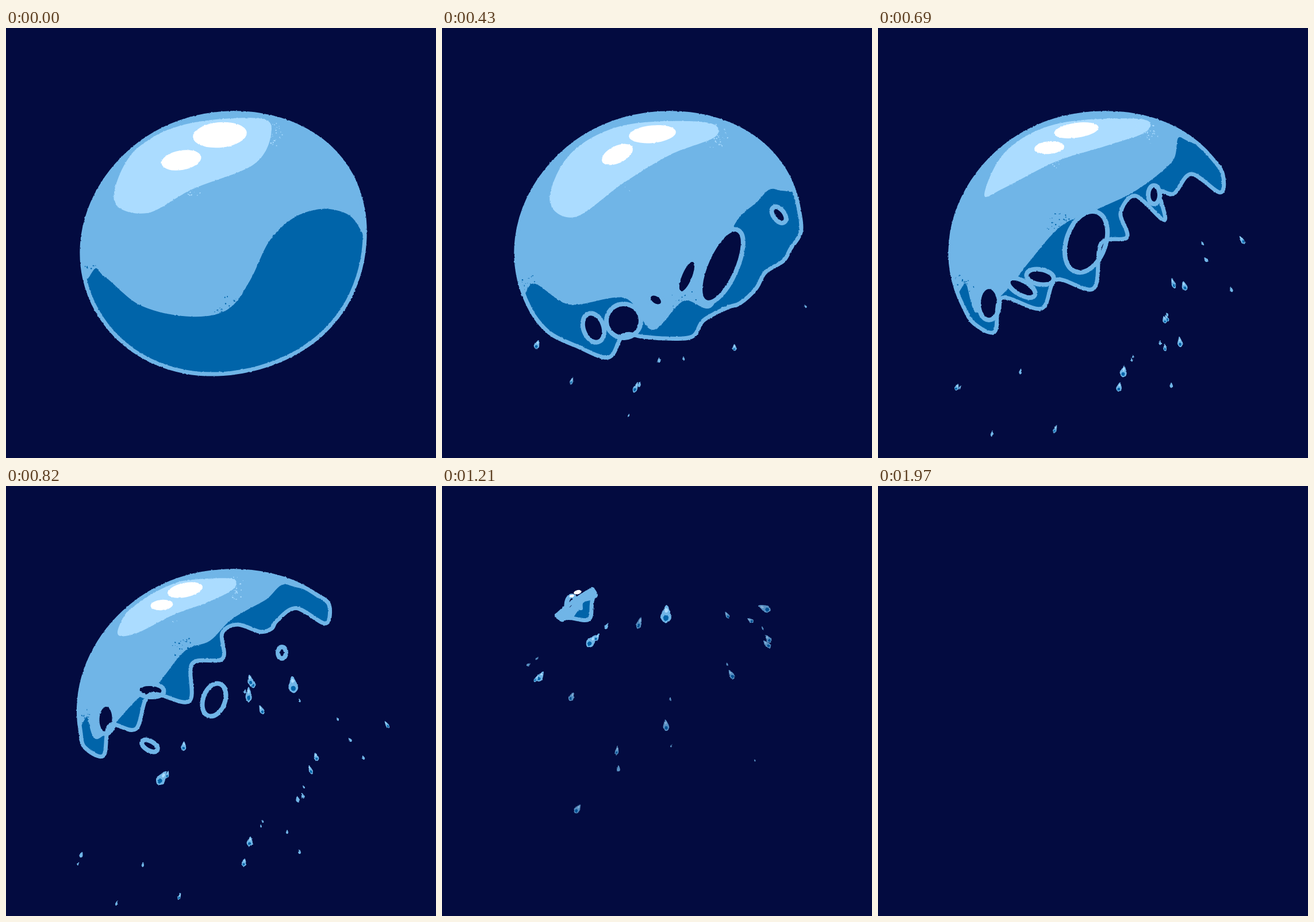
Animation, 748 px wide and 748 px high, one loop 2200 ms. Source, as an HTML page:

```html
<!DOCTYPE html>
<html lang="en">
<head>
<meta charset="utf-8">
<title>Bubble pop</title>
<style>
  html, body { margin: 0; width: 100%; height: 100%; overflow: hidden; background: #030b40; }
  svg { display: block; width: 100vw; height: 100vh; }
  #stage > g { display: none; }
  #stage > g.on { display: inline; }
</style>
</head>
<body>
<svg viewBox="0 0 748 748">
  <filter id="rough" x="0" y="0" width="748" height="748" filterUnits="userSpaceOnUse" color-interpolation-filters="sRGB">
    <feTurbulence type="fractalNoise" baseFrequency=".25" numOctaves="2" seed="4"/>
    <feDisplacementMap in="SourceGraphic" scale="2.5" xChannelSelector="R" yChannelSelector="G"/>
  </filter>
  <g id="stage" filter="url(#rough)"></g>
</svg>
<script>
const NIGHT = '#030b40', WATER = '#70b5e7', DEEP = '#0064a9', PALE = '#abdcff', WHITE = '#fff';
const LOOP = 2200, RIM = 7;
const { sin, cos, PI, hypot, atan2, max, min, round } = Math;

let seed = 11;
const random = (low = 0, high = 1) => {
  seed = seed * 16807 % 2147483647;
  return low + (high - low) * seed / 2147483647;
};
const mix = (a, b, t) => Array.isArray(a) ? a.map((v, i) => mix(v, b[i], t)) : a + (b - a) * t;
const list = text => text.split(' ').map(item => item.split(',').map(Number));
const range = (n, fn) => Array.from({ length: n }, (_, i) => fn(i));
const shrink = (shape, x, y) => shape.map(([px, py, ...size]) =>
  [x + (px - 265) * .3, y + (py - 195) * .3, ...size.map((v, i) => i < 2 ? v * .3 : v)]);

// Steps 0 to 12: start times of the pictures.
const startOf = step => step === 0 ? 0 : step < 10 ? 170 + 130 * step : [1540, 1740, 1970][step - 10];

// The ball is a slightly tilted ellipse; swell pushes its left side out.
function rim(angle, swell = 0, depth = 1) {
  const twice = sin(2 * angle);
  const r = depth * (1 - .036 * twice + .012 * twice ** 2 * (1 + cos(angle)) + swell * max(0, -cos(angle)));
  return [378 + 245.5 * r * cos(angle), 375 + 226.5 * r * sin(angle)];
}

// Key shapes by step; the steps between them are mixed.
const arc = { 1: [2.6, 6.4, 0], 3: [2.5, 5.99, .025], 4: [2.52, 5.75, .025], 6: [3.08, 5.25, .02], 8: [3.88, 4.21, .02] };
const edge = {
  1: list('600,434 588,450 570,498 542,532 508,526 492,564 418,537 378,566 350,592 300,566 260,571 238,572 210,552 178,517'),
  3: list('612,335 600,360 555,352 550,375 528,432 502,408 492,480 492,508 425,488 398,508 370,498 341,574 255,553 205,550'),
  4: list('595,286 545,254 515,288 490,286 498,334 448,292 422,322 433,364 388,375 375,453 310,438 284,488 215,470 203,528'),
  6: list('516,192 465,171 428,180 434,210 385,173 358,190 330,190 320,237 260,243 262,296 190,288 168,357 146,362 136,410'),
  8: range(14, i => rim(4.21 - .33 * i / 13, .02, .95 - .13 * sin(PI * i / 13) ** 2))
};
const shade = {
  0: list('148,428 172,433 235,483 320,502 385,490 424,440 460,368 510,325 570,316 616,350 650,480 380,680 100,560'),
  1: list('155,447 222,484 292,500 340,550 410,480 470,487 525,375 535,318 580,312 640,350 350,650 150,560'),
  3: list('152,447 222,478 345,440 392,500 430,470 475,476 484,328 560,288 583,250 640,330 350,650 150,560'),
  4: list('150,445 172,495 225,455 262,408 318,345 380,316 450,282 512,232 530,192 610,300 350,650 130,560'),
  6: list('128,360 148,385 230,288 262,286 303,230 330,222 335,182 390,165 455,153 520,190 350,400 130,430')
};
const shine = {
  0: list('440,157 310,168 222,215 188,300 245,322 325,280 430,238 461,185'),
  3: list('465,167 320,170 225,220 187,300 225,332 310,265 380,212 484,190'),
  4: list('455,158 310,167 222,215 185,290 220,278 310,232 400,204 467,180'),
  6: list('320,163 260,172 220,198 203,222 232,235 275,215 308,198 327,175')
};
// Ovals: x, y, radii, turn.
const glints = {
  0: list('372,186,47,22,-5 305,230,35,17,-10'),
  3: list('363,184,38,12,-6 305,215,26,14,-33'),
  4: list('345,178,39,13,-8 298,208,26,11,-5'),
  6: list('278,184,23,12,-15 244,206,13,7,-5')
};
const holes = {
  1: list('481,420,17,47,15 427,443,8,15,25 322,516,26,17,15 277,530,8,14,0'),
  3: list('492,408,28,82,33 425,422,9,40,20 310,503,26,34,-20 250,513,19,30,-40 372,473,20,12,35 586,325,11,24,-38'),
  4: list('282,433,20,9,10 193,479,14,25,0 362,372,30,51,20 480,290,6,12,0 250,452,22,8,30'),
  6: list('221,278,18,6,-3 154,332,8,18,5'),
  8: list('224,203,3,8,15')
};
shade[8] = shrink(shade[6], 225, 207);
shine[8] = shrink(shine[6], 232, 188);
glints[8] = shrink(glints[6], 232, 188);

function at(track, step) {
  const keys = Object.keys(track).map(Number);
  const from = keys.findLast(k => k <= step), to = keys.find(k => k >= step);
  if (from === to) return track[from];
  const a = track[from], b = track[to];
  // A part missing on one side grows from or shrinks to nothing.
  const fill = (own, other) => [...own, ...other.slice(own.length).map(([x, y, , , turn]) => [x, y, 0, 0, turn])];
  return a.length === b.length ? mix(a, b, (step - from) / (to - from))
    : mix(fill(a, b), fill(b, a), (step - from) / (to - from));
}

// Closed Catmull-Rom curve.
function curve(pts) {
  const point = i => pts[(i + pts.length) % pts.length];
  const handle = (p, a, b) => p.map((v, k) => (v + (b[k] - a[k]) / 6).toFixed(1));
  return pts.reduce((d, p, i) => {
    const q = point(i + 1);
    return d + `C${handle(p, point(i - 1), q)} ${handle(q, point(i + 2), p)} ${q}`;
  }, `M${pts[0]}`) + 'Z';
}
const blob = (fill, pts, more = '') => `<path fill="${fill}" d="${curve(pts)}" ${more}/>`;
const oval = (fill, [x, y, rx, ry, turn = 0], more = '') =>
  `<ellipse fill="${fill}" rx="${rx}" ry="${ry}" transform="translate(${x} ${y}) rotate(${turn})" ${more}/>`;
const outline = width => `stroke="${WATER}" stroke-width="${width}" stroke-linejoin="round"`;

const dust = (fill, [x, y], spread, count) => range(count, () => {
  const a = random(0, 2 * PI), r = spread * random() ** .7, size = random(.4, 1.3);
  return oval(fill, [x + r * cos(a), y + r * sin(a), size, size]);
}).join('');

function ball(step) {
  const [from, to, swell] = step ? at(arc, step) : [0, 2 * PI * 23 / 24, 0];
  const body = range(24, i => rim(mix(from, to, i / 23), swell));
  if (step) body.push(...at(edge, step));
  const dark = at(shade, step), light = at(shine, step);
  const spots = step < 7 ? dust(DEEP, dark[4], 24, 35) + dust(DEEP, dark[0], 18, 20)
    + dust(PALE, light[7], 22, 35) + dust(PALE, light[5], 18, 15) : '';
  return `<clipPath id="ball${step}"><path d="${curve(body)}"/></clipPath>`
    + blob(WATER, body)
    + `<g clip-path="url(#ball${step})">${blob(DEEP, dark)}${blob(PALE, light)}${spots}</g>`
    + (step ? at(holes, step).map(h => oval(NIGHT, h, outline(16) + ' paint-order="stroke"')).join('') : '')
    + blob('none', body, outline(RIM))
    + at(glints, step).map(g => oval(WHITE, g)).join('');
}

// Droplets tear off the previous edge, fly outward, slow down and shrink.
const drops = range(8, i => i + 1).flatMap(born => range(round(10 * sin(PI * born / 10)), () => {
  const torn = at(edge, max(1, born - 1));
  const [x, y] = torn[Math.floor(random(0, torn.length))];
  const away = atan2(y - 100, x - 400) + random(-.3, .3);
  const length = 3.5 + random(5, 11 + born) * random() ** 1.5;
  return { born, x, y, away, length, slim: random(.38, .6), reach: random(50, 200), life: random(1, 4) };
}));

function droplet({ born, x, y, away, length, slim, reach, life }, step) {
  const age = step - born;
  if (age < 0 || age >= life) return '';
  const gone = reach * (1 - .6 ** (age + .5));
  const l = length * (1 - .12 * age), w = l * slim;
  const opacity = 1 - .22 * max(0, step - 7) * min(1, age);
  const tear = [[-l, 0], [-.3 * l, -.7 * w], [.5 * l, -w], [l, 0], [.4 * l, w], [-.4 * l, .6 * w]];
  const inside = l < 6 ? '' : oval(DEEP, [.45 * l, 0, .3 * l, .5 * w]) + oval(PALE, [-.4 * l, 0, .25 * l, .3 * w]);
  return `<g opacity="${opacity}" transform="translate(${x + gone * cos(away)} ${y + gone * sin(away)}) rotate(${away * 180 / PI})">`
    + blob(WATER, tear) + inside + '</g>';
}

const poses = range(13, step => {
  const node = document.createElementNS('http://www.w3.org/2000/svg', 'g');
  if (step < 12) node.innerHTML = (step < 9 ? ball(step) : '') + drops.map(d => droplet(d, step)).join('');
  document.getElementById('stage').append(node);
  return { start: startOf(step), node };
});

const origin = performance.now();
let current;
function tick() {
  const t = (performance.now() - origin) % LOOP;
  const { node } = poses.findLast(p => p.start <= t);
  if (node !== current) {
    current?.classList.remove('on');
    node.classList.add('on');
    current = node;
  }
  requestAnimationFrame(tick);
}
tick();
</script>
</body>
</html>
```
